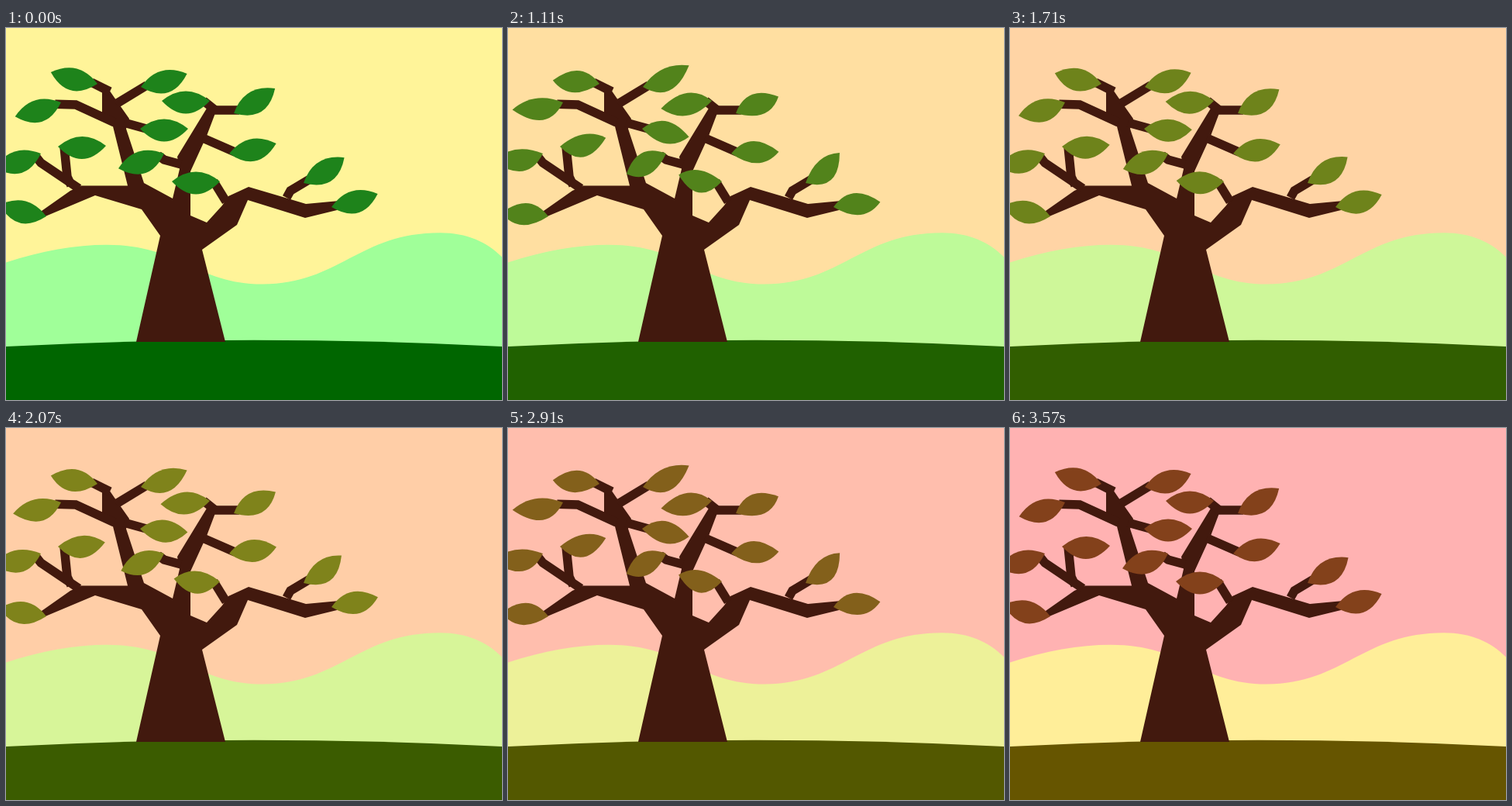
Recreate the animation shown at these times as an HTML page with a canvas. Size 640 by 480 pixels, loop 3.6 s.

```html
<!DOCTYPE html>
<html lang="en">
<head>
<meta charset="utf-8">
<title>Tree through the seasons</title>
<style>
  html, body { margin: 0; width: 100%; height: 100%; overflow: hidden; }
  canvas { display: block; }
</style>
</head>
<body>
<canvas id="stage" width="640" height="480"></canvas>
<script>
const ctx = document.getElementById('stage').getContext('2d');
const LOOP = 3600, STEP = 30, LAST = LOOP / STEP - 1;
const LEAF = 62, SWAY = 14, TWIG = 11.5, OVERLAP = 8;
const BARK = '#42190e';

const hills = new Path2D(`M0 302.5 C45 287.5 90 279.7 130 279.7 C225 279.7 245 330.5 331 330.5
  C430 330.5 455 264.3 560 264.3 C595 264.3 620 276 640 295.5 V480 H0 Z`);
const ground = new Path2D('M0 411 Q320 394.5 640 411 V480 H0 Z');

// Trunk and thick limbs, clockwise from the left foot.
const trunk = new Path2D(`M168 405 L199 268 175 234 115 216 46 245 46 236 83 210 97 203.5
  H157 L138 127 124 109 V83 L129 74 140 90 159 117 155 130 178 200 215 220 224 182 221 166
  260 102 H273 L259 139 238 185 V242 L259 251 279 229 287 217 313 205 357 218 387 227
  430 223 427 235 386 245 312 222 298 254 253 286 283 405 Z`);

const radians = deg => deg * Math.PI / 180;
const mix = (a, b, k) => a.map((v, i) => v + (b[i] - v) * k);

// Angles in degrees: where the leaf points, and where its tip drifts.
// The route leads the twig from its limb towards the stem.
const leaf = (x, y, lean, drift, ...route) =>
  ({ x, y, lean: radians(lean), drift: radians(drift), route });

const leaves = [
  leaf(118, 72, 194, 90, [134, 82]),
  leaf(174, 76, -16, -90, [142, 98]),
  leaf(71, 96, 163, -125, [140, 122], [90, 99]),
  leaf(263, 94, 180, 110, [270, 106]),
  leaf(294, 110, -31, 80, [266, 106]),
  leaf(173, 130, 0, 98, [152, 122]),
  leaf(67, 153, -1, -105, [84, 203], [79, 192]),
  leaf(204, 162, 162, 42, [226, 176], [204, 170]),
  leaf(276, 198, 180, -54, [284, 224]),
  leaf(288, 162, -12, 86, [254, 142]),
  leaf(384, 200, -32, -145, [362, 219], [367, 210]),
  leaf(420, 231, -16, 86),
  leaf(45, 162, 163, -125, [94, 207], [45, 174]),
  leaf(52, 243, 194, 90)
];

function fill(path, from, to, k) {
  ctx.fillStyle = `rgb(${mix(from, to, k).map(Math.round)})`;
  ctx.fill(path);
}

function drawTwig({ x, y, lean, route }) {
  ctx.beginPath();
  for (const point of route) ctx.lineTo(...point);
  ctx.lineTo(x + OVERLAP * Math.cos(lean), y + OVERLAP * Math.sin(lean));
  ctx.stroke();
}

// The edge controls stay put while only the tip travels.
function drawLeaf({ x, y, lean, drift }, sway) {
  const up = Math.cos(lean) > 0 ? -1 : 1;
  const turn = drift - lean;
  ctx.save();
  ctx.translate(x, y);
  ctx.rotate(lean);
  ctx.beginPath();
  ctx.moveTo(0, 0);
  ctx.quadraticCurveTo(LEAF / 2, 25 * up,
    LEAF + sway * Math.cos(turn), sway * Math.sin(turn));
  ctx.quadraticCurveTo(LEAF / 2, -33 * up, 0, 0);
  ctx.fill();
  ctx.restore();
}

function draw(now) {
  const k = Math.floor(now % LOOP / STEP) / LAST;
  const sway = SWAY * (1 - Math.abs(1 - 4 * k % 2));

  ctx.fillStyle = `rgb(${mix([255, 244, 153], [255, 178, 178], k).map(Math.round)})`;
  ctx.fillRect(0, 0, 640, 480);
  fill(hills, [160, 255, 153], [255, 238, 153], k);
  fill(ground, [0, 102, 0], [102, 85, 0], k);

  ctx.fillStyle = ctx.strokeStyle = BARK;
  ctx.lineWidth = TWIG;
  ctx.fill(trunk);
  leaves.forEach(drawTwig);

  ctx.fillStyle = `hsl(${118 - 96 * k}, 66%, 31%)`;
  for (const each of leaves) drawLeaf(each, sway);
}

const start = performance.now();
function tick() {
  draw(performance.now() - start);
  requestAnimationFrame(tick);
}
tick();
</script>
</body>
</html>
```
